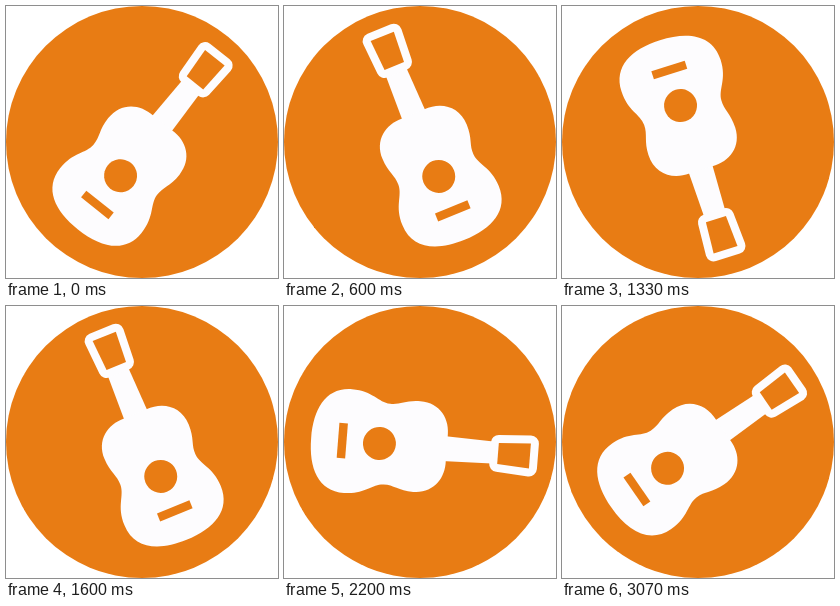
These frames come from a looping animation (272 by 272 pixels, 3140 ms). An HTML page:

```html
<!DOCTYPE html>
<html lang="en">
<head>
<meta charset="utf-8">
<title>Spinning guitar</title>
<style>
  html, body { margin: 0; width: 100%; height: 100%; overflow: hidden; background: #fff; }
  svg { display: block; width: 100%; height: 100%; }
</style>
</head>
<body>
<svg viewBox="0 0 272 272">
  <circle cx="136" cy="136" r="136" fill="#e87c14"/>
  <g id="guitar" fill="#fdfcfe">
    <!-- neck -->
    <path d="M-11-74H11L12.5-24H-12.5Z"/>
    <!-- body -->
    <path d="M-12-28C-30-29-45.5-18-45.5 2C-45.5 17-40 22-40.5 32C-41 44-52 50-52 71C-52 97-30 108 0 108
             C30 108 52 97 52 71C52 50 41 44 40.5 32C40 22 45.5 17 45.5 2C45.5-18 30-29 12-28Z"/>
    <g fill="#e87c14">
      <!-- head: thick rounded rim around an opening -->
      <path d="M-12-111.5H13L11-79.5H-10Z" stroke="#fdfcfe" stroke-width="16" stroke-linejoin="round" paint-order="stroke"/>
      <!-- sound hole and bridge -->
      <circle cy="39.5" r="16.5"/>
      <rect x="-17.5" y="72.5" width="35" height="8.5"/>
    </g>
  </g>
</svg>
<script>
  const LOOP = 3140, FPS = 15, LAST_STEP = 46;
  const guitar = document.getElementById('guitar');
  const cosDeg = degrees => Math.cos(degrees * Math.PI / 180);

  // One turn per second: slow while upright, fast while hanging
  function angleAt(seconds) {
    const turn = 360 * seconds;
    return turn + 65.5 - 47.6 * cosDeg(turn - 46) + 10 * cosDeg(2 * (turn - 26.5));
  }

  function draw() {
    const time = performance.now() % LOOP;
    // steps begin on the nearest 10 ms
    const step = Math.min(LAST_STEP, Math.floor((time + 5) * FPS / 1000));
    guitar.setAttribute('transform', `translate(135.2 135.7) rotate(${angleAt(step / FPS)}) translate(5 0)`);
    requestAnimationFrame(draw);
  }
  draw();
</script>
</body>
</html>
```
